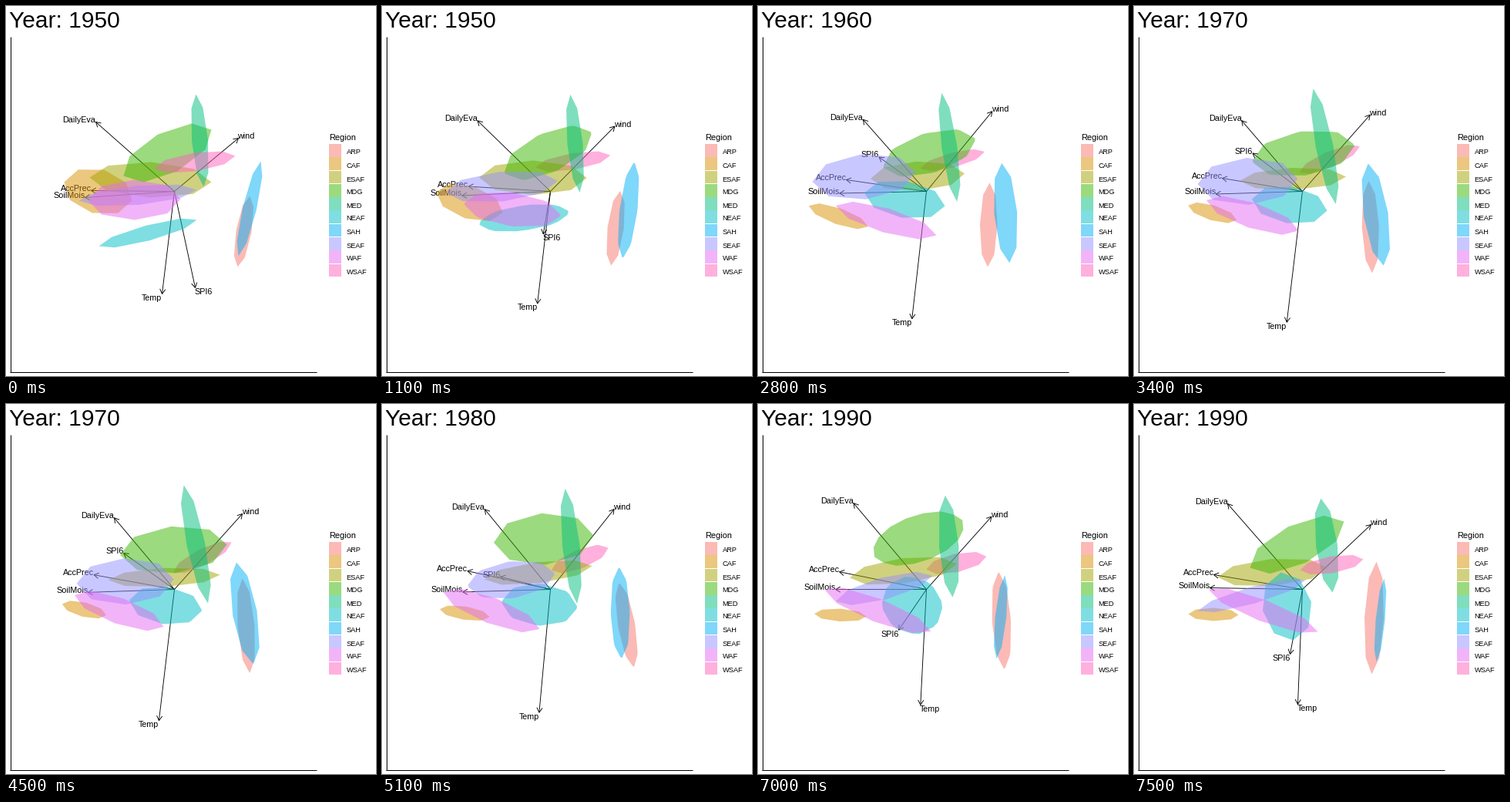
Animation, 480 px wide and 480 px high, one loop 8000 ms. Source, as a matplotlib script:

```python
import numpy as np
import matplotlib.pyplot as plt
from matplotlib.animation import FuncAnimation
from matplotlib.patches import Polygon, Rectangle

SIZE, DPI = 480, 72
FRAMES, INTERVAL = 80, 100
LEAD, CYCLE, STEPS = 6, 19, 12      # first hold, frames per decade, frames per morph
CORNERS, POINTS = 8, 48             # hull corners, outline points used for morphing
ORIGIN = np.array([218, 240])
KEY_TOP, KEY_PITCH, KEY_HEIGHT = 179.5, 17.28, 16.7

plt.rcParams["font.family"] = "Liberation Sans"
fig = plt.figure(figsize=(SIZE / DPI, SIZE / DPI), dpi=DPI, facecolor="white")
ax = fig.add_axes([0, 0, 1, 1])
ax.set_xlim(-0.5, SIZE - 0.5)
ax.set_ylim(SIZE - 0.5, -0.5)
ax.axis("off")


def spindle(x0, y0, x1, y1, width):
    """Octagonal hull along the axis (x0, y0)-(x1, y1), resampled along its edges."""
    axis = np.array([x1 - x0, y1 - y0]) / 2
    side = np.array([-axis[1], axis[0]]) / np.hypot(*axis) * width / 2
    angle = np.linspace(0, 2 * np.pi, CORNERS + 1)[:, None]
    corners = (np.array([x0, y0]) + axis
               - np.cos(angle) * axis - np.sin(angle) * side)
    steps = np.linspace(0, CORNERS, POINTS, endpoint=False)
    return np.transpose([np.interp(steps, np.arange(CORNERS + 1), c)
                         for c in corners.T])


def align(outline, previous):
    """Rotate the point order to lie closest to the previous outline."""
    turns = [np.roll(outline, s, axis=0) for s in range(POINTS)]
    return min(turns, key=lambda o: ((o - previous) ** 2).sum())


def line(xs, ys, width=0.9):
    return ax.plot(xs, ys, color="black", lw=width, solid_capstyle="butt",
                   solid_joinstyle="miter", zorder=1)[0]


regions = []


def add_region(name, color, *hulls):
    """Each hull is an axis and a width, one per decade."""
    row = len(regions)
    outlines = [spindle(*hulls[0])]
    for hull in hulls[1:]:
        outlines.append(align(spindle(*hull), outlines[-1]))
    style = dict(facecolor=color, alpha=0.5, lw=0)
    patch = ax.add_patch(Polygon(outlines[0], closed=True, zorder=3 + row, **style))
    top, bottom = np.floor(KEY_TOP + KEY_PITCH * row + np.array([0, KEY_HEIGHT]))
    ax.add_patch(Rectangle((418.5, top - 0.5), 16, bottom - top, **style))
    ax.text(441, top + 13, name, size=9.3)
    regions.append((patch, np.array(outlines)))


add_region("ARP", "#F8766D",
           (316, 246, 300, 338, 20), (298, 230, 292, 334, 23),
           (306, 225, 314, 350, 22), (308, 236, 335, 335, 22),
           (314, 204, 308, 350, 25))
add_region("CAF", "#D89000",
           (75, 228, 163, 252, 58), (63, 259, 147, 290, 22),
           (72, 258, 128, 273, 19), (76, 271, 147, 278, 16),
           (70, 272, 135, 273, 17))
add_region("ESAF", "#A3A500",
           (108, 222, 266, 228, 46), (150, 222, 264, 215, 43),
           (132, 228, 278, 223, 24), (133, 226, 268, 200, 30),
           (108, 224, 250, 212, 35))
add_region("MDG", "#39B600",
           (152, 220, 266, 160, 54), (166, 212, 280, 168, 50),
           (148, 198, 288, 184, 60), (142, 166, 264, 160, 72),
           (150, 212, 272, 152, 52))
add_region("MED", "#00BF7D",
           (246, 114, 256, 234, 21), (241, 115, 256, 252, 19),
           (229, 104, 263, 258, 24), (243, 113, 245, 259, 22),
           (242, 122, 257, 244, 28))
add_region("NEAF", "#00BFC4",
           (120, 311, 247, 277, 20), (130, 238, 238, 256, 48),
           (160, 254, 254, 268, 48), (150, 258, 253, 260, 60),
           (190, 218, 206, 306, 64))
add_region("SAH", "#00B0F6",
           (330, 201, 301, 324, 18), (322, 203, 327, 331, 29),
           (297, 204, 322, 338, 33), (314, 216, 302, 324, 18),
           (324, 226, 314, 334, 12))
add_region("SEAF", "#9590FF",
           (94, 252, 247, 238, 25), (64, 226, 200, 210, 58),
           (88, 232, 216, 228, 62), (126, 238, 230, 214, 38),
           (82, 268, 222, 228, 22))
add_region("WAF", "#E76BF3",
           (106, 252, 226, 250, 52), (104, 262, 240, 300, 31),
           (90, 248, 204, 288, 34), (71, 240, 204, 294, 34),
           (96, 240, 238, 295, 28))
add_region("WSAF", "#FF62BC",
           (192, 210, 297, 194, 24), (208, 208, 294, 192, 18),
           (216, 218, 292, 178, 21), (222, 213, 294, 192, 27),
           (215, 215, 297, 201, 22))

TIPS = {
    "DailyEva": [(116, 150), (134, 146), (141, 149), (127, 127), (121, 129)],
    "wind": [(301, 171), (302, 134), (307, 143), (296, 131), (307, 156)],
    "AccPrec": [(110, 239), (114, 226), (114, 222), (108, 212), (103, 221)],
    "SoilMois": [(102, 248), (105, 242), (106, 244), (103, 243), (98, 238)],
    "Temp": [(202, 373), (200, 403), (197, 412), (208, 391), (212, 389)],
    "SPI6": [(245, 365), (158, 198), (152, 188), (154, 249), (202, 324)],
}
arrows = [(line([], []), line([], []), ax.text(0, 0, name, size=10.7, zorder=2),
           np.array(tips, float)) for name, tips in TIPS.items()]

line([5, 5], [39, 474], 1)
line([4.5, 402.5], [474, 474], 1)
title = ax.text(4, 28, "", size=30)
ax.text(418.5, 173, "Region", size=11)


def place_arrow(shaft, head, label, tip):
    shaft.set_data(*np.transpose([ORIGIN, tip]))
    back = np.arctan2(*(ORIGIN - tip)[::-1])
    barbs = [tip + 7.2 * np.array([np.cos(a), np.sin(a)])
             for a in (back - np.pi / 6, back + np.pi / 6)]
    head.set_data(*np.transpose([barbs[0], tip, barbs[1]]))
    # labels grow outward from the middle of the panel
    x, y = tip
    left = x < 204
    label.set_ha("right" if left else "left")
    label.set_position((x if left else x - 1, y + (0.5 if y < 256.5 else 8.5)))


def update(n):
    state, step = divmod(max(n - LEAD, 0), CYCLE)
    step = min(step, STEPS)
    part = step / STEPS

    def blend(values):
        return values[state] * (1 - part) + values[state + 1] * part

    title.set_text(f"Year: {1950 + 10 * (state + (part >= 0.5))}")
    for patch, outlines in regions:
        patch.set_xy(blend(outlines))
    # while morphing, the tenth region sorts right after the first
    last = regions[-1][0]
    last.set_zorder(3.5 if 0 < part < 1 else 3 + len(regions))
    for shaft, head, label, tips in arrows:
        place_arrow(shaft, head, label, blend(tips))
    return []


anim = FuncAnimation(fig, update, frames=FRAMES, interval=INTERVAL,
                     init_func=lambda: update(0), repeat=True, repeat_delay=0)
plt.show()
```
